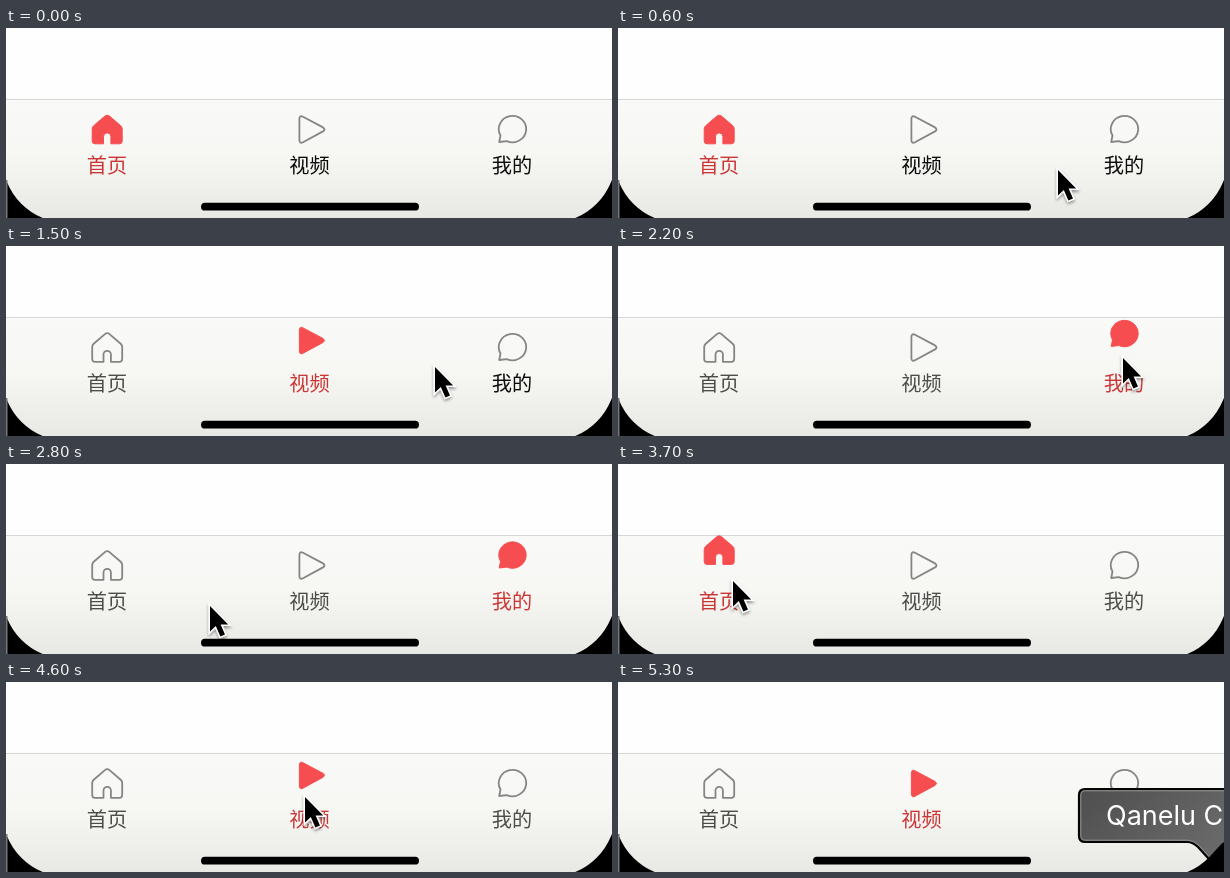
These frames come from a looping animation (606 px wide and 190 px high, 5400 ms). An HTML page:

```html
<!DOCTYPE html>
<html lang="zh-CN">
<head>
<meta charset="utf-8">
<title>Tab bar</title>
<style>
  html, body { margin: 0; width: 100%; height: 100%; overflow: hidden; background: #fefefe; }
  svg { display: block; width: 606px; height: 190px; }
  .label { font: 20.2px "Noto Sans CJK SC", "Noto Sans CJK", sans-serif; text-anchor: middle; fill: #4c4c4b; }
  .new .label { fill: #0c0c0c; }
  .on .label { fill: #cb3737; }
  .icon { fill: none; stroke: #858584; stroke-width: 1.8; stroke-linejoin: round; }
  .on .icon { fill: #f64e50; stroke: #f64e50; stroke-width: 1; }
  .tip text { font: 27px Inter, "Liberation Sans", sans-serif; fill: #fff; }
</style>
</head>
<body>
<svg viewBox="0 0 606 190">
  <defs>
    <linearGradient id="bar" x2="0" y2="1">
      <stop stop-color="#f9f9f8"/>
      <stop offset=".45" stop-color="#f7f7f4"/>
      <stop offset="1" stop-color="#e8e8e4"/>
    </linearGradient>
    <linearGradient id="bubble" x2="1" y2=".5">
      <stop stop-color="#4e4e4e"/>
      <stop offset="1" stop-color="#696969"/>
    </linearGradient>
    <filter id="shadow" x="-50%" y="-50%" width="200%" height="200%">
      <feDropShadow dx="0" dy="2" stdDeviation="1.6" flood-opacity=".4"/>
    </filter>
    <path id="corner" d="M-4 129A66 66 0 0 0 62 195H-4Z"/>
  </defs>

  <rect width="606" height="190" fill="#fefefe"/>
  <rect y="72" width="606" height="118" fill="url(#bar)"/>
  <rect y="71" width="606" height="1" fill="#d6d6d7"/>

  <g class="tab">
    <path class="icon" d="M98.900 88.100Q101.200 86.200 103.500 88.100L114.700 97.700Q116.200 99 116.200 101V113Q116.200 115.800 113.400 115.800H104.900V108.600A3.700 3.700 0 0 0 97.500 108.600V115.800H89Q86.200 115.800 86.200 113V101Q86.200 99 87.700 97.700Z"/>
    <text class="label" x="101" y="145">首页</text>
  </g>
  <g class="tab">
    <path class="icon" d="M293.4 91Q293.4 87 297 88.8L317 99.4Q320 101.4 317 103.4L297 114.2Q293.4 116 293.4 112Z"/>
    <text class="label" x="303.5" y="145">视频</text>
  </g>
  <g class="tab">
    <path class="icon" d="M493.200 114L494.500 107.500A13.700 13.200 0 1 1 500.800 113.100Z"/>
    <text class="label" x="506" y="145">我的</text>
  </g>

  <rect x="195" y="174.8" width="218" height="7.8" rx="3.9"/>
  <use href="#corner"/>
  <use href="#corner" transform="matrix(-1 0 0 1 606 0)"/>
  <rect y="152" width="1.5" height="38" fill="#777"/>

  <g class="tip">
    <path d="M467 107H620V160H610Q606 160 602 165L591 177L580 165Q575 160 569 160H467Q461 160 461 154V113Q461 107 467 107Z" fill="url(#bubble)" stroke="#050505" stroke-width="2.2"/>
    <path d="M620 108.800H467.500Q462.800 108.800 462.800 113.500V153.500Q462.800 158.200 467.500 158.200H570Q576 158.500 581 163.500L591 174.500" fill="none" stroke="#939393"/>
    <text x="488" y="143">Qanelu C</text>
  </g>

  <path class="cursor" d="M0 0V25.500L5.800 20L10.400 30.400L15 28.400L10.600 18.600H18.200Z" fill="#000" stroke="#fff" stroke-width="3" paint-order="stroke" filter="url(#shadow)"/>
</svg>
<script>
  const LOOP = 5400, STEP = 100;
  const HOME = 0, VIDEO = 1, MINE = 2;
  const taps = [[1161, VIDEO], [2116, MINE], [3598, HOME], [4268, VIDEO]];
  // time, x, y of the pointer tip
  const trail = [
    [200, 548, 192], [600, 440, 142], [950, 303, 113], [1250, 303, 113],
    [1500, 429, 121], [1800, 505, 112], [2300, 505, 112], [2800, 204, 142],
    [3250, 117, 117], [3700, 115, 117], [3900, 120, 117], [4200, 299, 115],
    [4650, 299, 115], [5050, 588, 194]
  ];
  const TIP_AT = 5100;

  const tabs = [...document.querySelectorAll('.tab')];
  const icons = tabs.map(tab => tab.querySelector('.icon'));
  const cursor = document.querySelector('.cursor');
  const tip = document.querySelector('.tip');

  const arc = (t, from, to, height) => {
    const p = (t - from) / (to - from);
    return p > 0 && p < 1 ? 4 * height * p * (1 - p) : 0;
  };
  // a high hop followed by a lower one
  const hop = t => arc(t, 0, 376, 19.5) + arc(t, 420, 800, 11.8);

  function pointer(t) {
    const i = trail.findIndex(k => k[0] > t);
    if (i < 1) return null;
    const [t0, x0, y0] = trail[i - 1], [t1, x1, y1] = trail[i];
    const p = (t - t0) / (t1 - t0);
    return [x0 + (x1 - x0) * p, y0 + (y1 - y0) * p];
  }

  function draw(t) {
    const done = taps.filter(tap => tap[0] <= t);
    const [tapTime, active] = done.length ? done[done.length - 1] : [-LOOP, HOME];
    tabs.forEach((tab, i) => {
      const on = i === active;
      const visited = i === HOME || done.some(tap => tap[1] === i);
      tab.classList.toggle('on', on);
      tab.classList.toggle('new', !visited);
      icons[i].setAttribute('transform', `translate(0 ${on ? -hop(t - tapTime) : 0})`);
    });
    const at = pointer(t);
    cursor.style.display = at ? '' : 'none';
    if (at) cursor.setAttribute('transform', `translate(${at})`);
    tip.style.display = t >= TIP_AT ? '' : 'none';
  }

  const start = performance.now();
  function tick() {
    const t = (performance.now() - start) % LOOP;
    draw(Math.floor(t / STEP) * STEP);
    requestAnimationFrame(tick);
  }
  tick();
</script>
</body>
</html>
```
